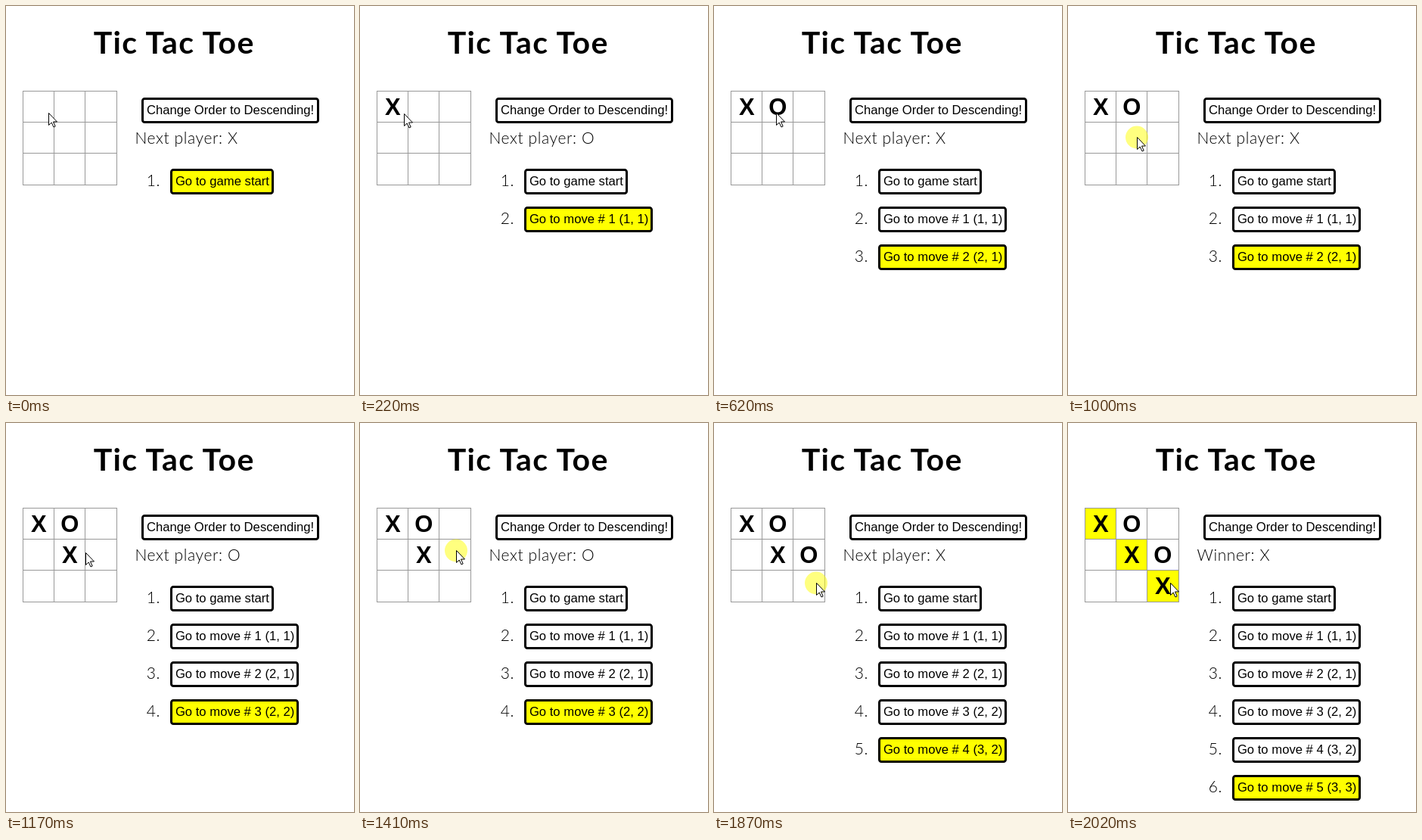
An HTML page for the animation above (2340 ms loop, 460x514 px).

```html
<!DOCTYPE html>
<html lang="en">
<head>
<meta charset="utf-8">
<title>Tic Tac Toe</title>
<style>
  html, body { margin: 0; width: 100%; height: 100%; overflow: hidden; background: #fff; }
  svg { display: block; }
  .title { font: 700 41px Lato, sans-serif; letter-spacing: 1.4px; text-anchor: middle; }
  .body { font: 300 21px Lato, sans-serif; letter-spacing: .6px; }
  .num { text-anchor: end; }
  .label { font: 16.67px "Liberation Sans", Arial, sans-serif; }
  .mark { font: 700 31px "Liberation Sans", Arial, sans-serif; text-anchor: middle; }
</style>
</head>
<body>
<svg id="stage" width="460" height="514" viewBox="0 0 460 514"></svg>
<script>
const stage = document.getElementById('stage');
const LOOP = 2340;
const HALO_DELAY = 220;

// Each move: click time and cell, counted row by row
const moves = [[60, 0], [620, 1], [1090, 4], [1640, 5], [2020, 8]]
  .map(([time, cell]) => ({ time, col: cell % 3, row: Math.floor(cell / 3) }));

// Pointer stops: time, x, y
const stops = [[60, 56, 141], [220, 58, 142], [620, 82, 141], [1000, 91, 173],
  [1410, 127, 168], [1640, 134, 195], [1870, 135, 211]];

const offset = i => Math.floor(i * 41.34);
const lineX = i => 22 + offset(i);
const lineY = i => 112 + offset(i);

const text = (cls, x, y, s) => `<text class="${cls}" x="${x}" y="${y}">${s}</text>`;
const rect = (x, y, w, h, fill) =>
  `<rect x="${x}" y="${y}" width="${w}" height="${h}" fill="${fill}"/>`;

function button(x, y, w, label, active) {
  return `<rect x="${x + 1.5}" y="${y + 1.5}" width="${w - 3}" height="31" rx="2.8"
    fill="${active ? '#ff0' : '#fff'}" stroke="#000" stroke-width="3"/>` +
    text('label', x + 6.9, y + 22, label);
}

function board(played, won) {
  let out = '';
  played.forEach(({ col, row }, i) => {
    const x = lineX(col), y = lineY(row);
    if (won && col === row) out += rect(x, y, 42, 42, '#ff0');
    out += text('mark', x + 21.3, y + 32, 'XO'[i % 2]);
  });
  for (let i = 0; i < 4; i++) {
    out += rect(lineX(i), 112, 1, 125, '#999') + rect(22, lineY(i), 125, 1, '#999');
  }
  return out;
}

function history(played) {
  const labels = ['Go to game start',
    ...played.map(({ col, row }, i) => `Go to move # ${i + 1} (${col + 1}, ${row + 1})`)];
  return labels.map((label, i) =>
    text('body num', 204, 237.5 + i * 50, `${i + 1}.`) +
    button(217, 215 + i * 50, i ? 170 : 137, label, i === played.length)).join('');
}

function pointerAt(t) {
  let [time, x, y] = stops[0];
  for (const [t1, x1, y1] of stops.slice(1)) {
    const u = Math.min(1, Math.max(0, (t - time) / (t1 - time)));
    const k = u * u * (3 - 2 * u);
    x += (x1 - x) * k;
    y += (y1 - y) * k;
    time = t1;
  }
  return [Math.round(x), Math.round(y)];
}

function pointer(t, last, won) {
  const [x, y] = pointerAt(t);
  const halo = last && !won && t - last.time >= HALO_DELAY;
  return (halo ? `<circle cx="${x}" cy="${y + .5}" r="15" fill="#ff0" opacity=".5"/>` : '') +
    `<path transform="translate(${x + .5} ${y + .5})" fill="#fff" stroke="#000"
      d="M0 0V16L3.7 12.5L6.5 18.5L8.7 17.5L6 11.5H11Z"/>`;
}

function draw() {
  const t = performance.now() % LOOP;
  const played = moves.filter(m => m.time <= t);
  const won = played.length === moves.length;
  const status = won ? 'Winner: X' : 'Next player: ' + 'XO'[played.length % 2];
  stage.innerHTML =
    text('title', 222.3, 63, 'Tic Tac Toe') +
    board(played, won) +
    button(179, 121, 235, 'Change Order to Descending!') +
    text('body', 170.5, 182, status) +
    history(played) +
    pointer(t, played[played.length - 1], won);
  requestAnimationFrame(draw);
}
draw();
</script>
</body>
</html>
```
